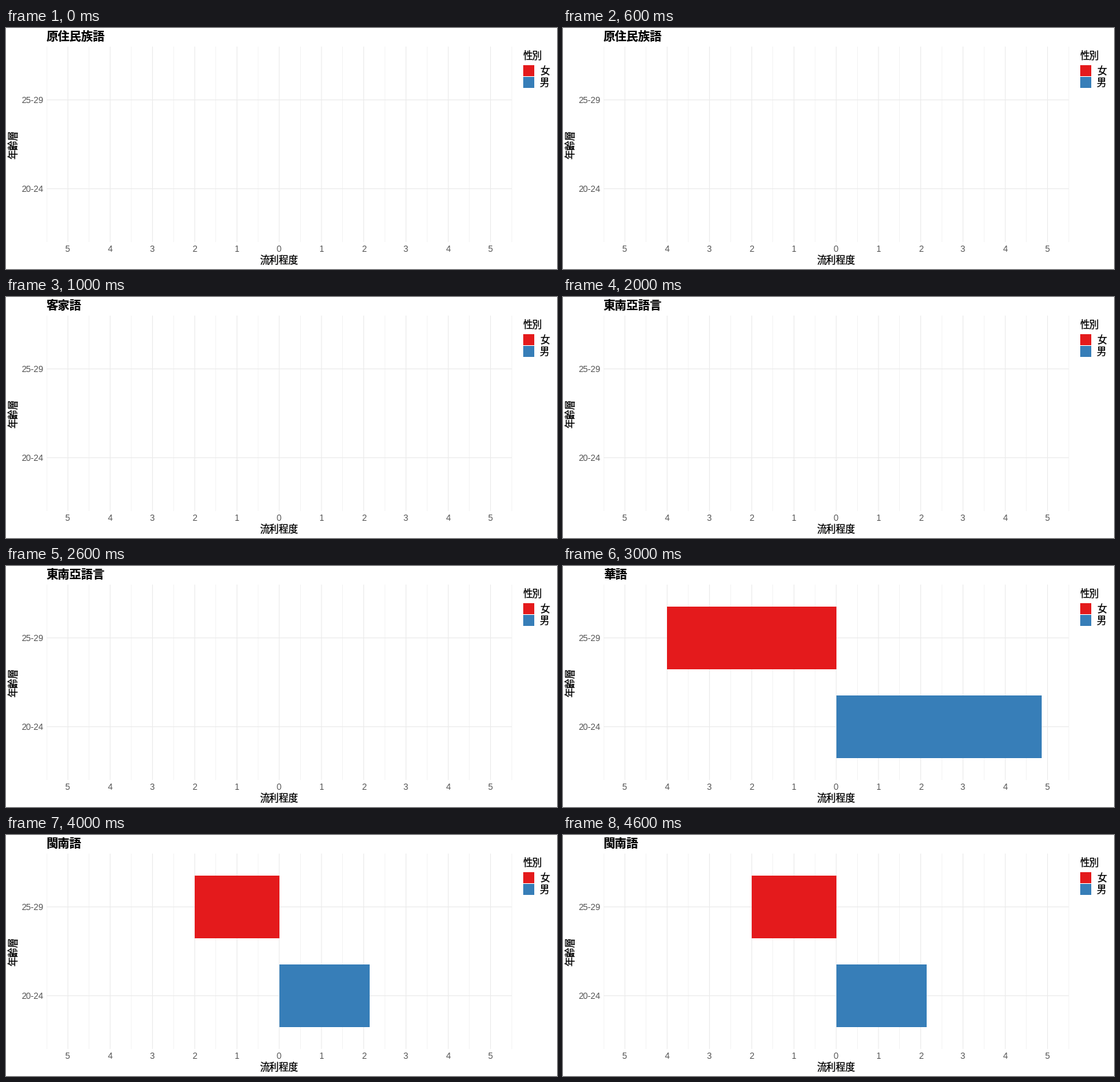
Write a matplotlib script that moves like this. It is 800x350 px and loops after 5 s.

```python
import matplotlib.pyplot as plt
from matplotlib.animation import FuncAnimation
from matplotlib.patches import Rectangle

W, H, DPI = 800, 350, 100
PX = 72 / DPI  # points per pixel

# Whole-pixel glyph advances
plt.rcParams["text.hinting_factor"] = 1
plt.rcParams["text.hinting"] = "default"

RED, BLUE = "#E41A1C", "#377EB8"
GRID, TICK = "#EBEBEB", "#4D4D4D"
CJK, SANS = "Noto Sans CJK JP", "Liberation Sans"

X0, UNIT = 396.7, 61.36
LEFT, RIGHT = X0 - 5.5 * UNIT, X0 + 5.5 * UNIT
TOP, BOTTOM = 27, 310.8
ROWS = {"25-29": 104.4, "20-24": 233.4}

# Title, female fluency (25-29), male fluency (20-24)
SCENES = [
    ("原住民族語", 0, 0),
    ("客家語", 0, 0),
    ("東南亞語言", 0, 0),
    ("華語", 4, 34 / 7),
    ("閩南語", 2, 15 / 7),
]

fig = plt.figure(figsize=(W / DPI, H / DPI), dpi=DPI, facecolor="white")
ax = fig.add_axes([0, 0, 1, 1])
ax.set_xlim(0, W)
ax.set_ylim(H, 0)
ax.axis("off")


def px(value):
    return X0 + value * UNIT


def label(x, y, text, size=14, font=CJK, color="black", **kw):
    return ax.text(x, y, text, fontsize=size * PX, family=font, color=color,
                   ha="left", va="baseline", **kw)


def box(x, y, w, h, color):
    return ax.add_patch(Rectangle((x, y), w, h, fc=color, lw=0, zorder=3))


# Grid
style = dict(colors=GRID, snap=False)
ax.vlines([px(k + 0.5) for k in range(-6, 6)], TOP, BOTTOM,
          lw=0.535 * PX, zorder=1, **style)
ax.hlines(list(ROWS.values()), LEFT, RIGHT, lw=1.07 * PX, zorder=2, **style)
ax.vlines([px(k) for k in range(-5, 6)], TOP, BOTTOM,
          lw=1.07 * PX, zorder=2, **style)

# Axis labels
for k in range(-5, 6):
    label(round(px(k) - 3.5), 325, str(abs(k)), 12, SANS, TICK)
for name, y in ROWS.items():
    label(22, round(y + 4.3), name, 12, SANS, TICK)
label(369, 342, "流利程度")
label(16, 190, "年齡層", rotation=90, rotation_mode="anchor")

# Legend
label(751, 45, "性別")
for i, (name, color) in enumerate([("女", RED), ("男", BLUE)]):
    box(751, 54 + 17 * i, 16, 16, color)
    label(775, 67 + 17 * i, name)

title = label(59, 18, "", 17, weight="bold")
female = box(397, 59, 0, 91, RED)
male = box(397, 188, 0, 91, BLUE)


def update(i):
    text, f, m = SCENES[i]
    title.set_text(text)
    for bar, value in ((female, -f), (male, m)):
        bar.set_width(round(px(value)) - round(X0))
        bar.set_visible(value != 0)
    return title, female, male


anim = FuncAnimation(fig, update, frames=len(SCENES), interval=1000,
                     repeat=True, repeat_delay=0)
plt.show()
```
